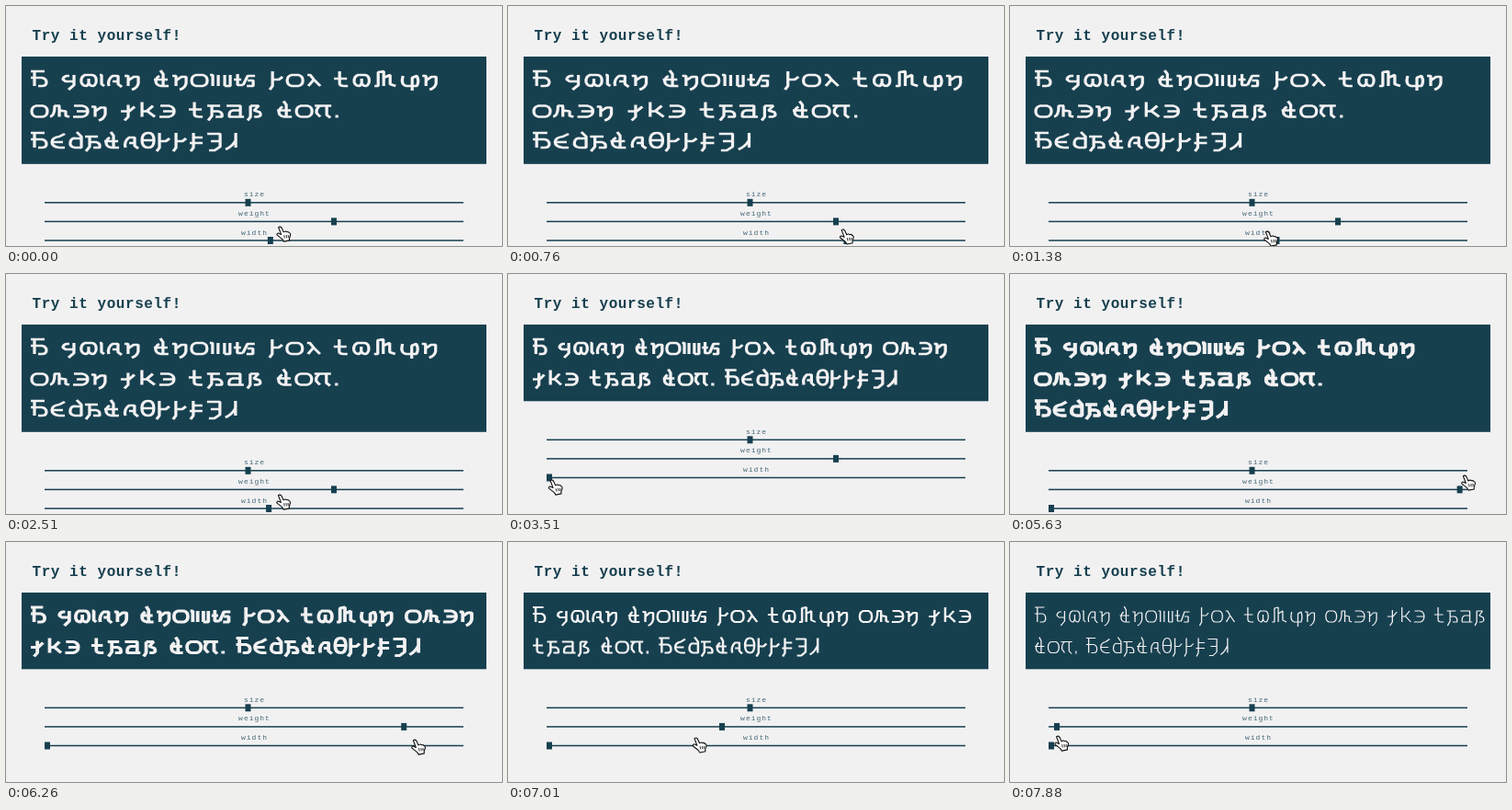
Write an HTML page with a canvas that moves like this. It is 540 px wide and 261 px high and loops after 8000 ms.

```html
<!DOCTYPE html>
<html lang="en">
<head>
<meta charset="utf-8">
<title>Type tester</title>
<style>
html, body { margin: 0; width: 100%; height: 100%; overflow: hidden; background: #f2f1f2; }
canvas { display: block; }
</style>
</head>
<body>
<canvas id="stage" width="540" height="261"></canvas>
<script>
const ctx = document.getElementById('stage').getContext('2d');
const INK = '#17404f', PAPER = '#f2f1f2', LOOP = 8000;
const NIB = 1.25; // the pen is a little wider than it is tall

// letter: [advance, centre line]
const glyphs = {
  B: [21, 'M0 3H15M4 3V19M0 10H12Q17 11 17 15T12 19H8'],
  s: [20, 'M9 8H6Q2 9 2 12L5 14H14M14 7V18L8 23'],
  w: [22, 'M6 7Q1 9 2 15Q3 19 8 19L10 16V11M10 16Q11 19 15 19Q19 17 18 11Q17 7 13 7H5'],
  i: [7, 'M0 7H2V17L5 19'],
  d: [20, 'M3 19Q1 12 7 8H13V17L17 20M7 14H13'],
  h: [20, 'M0 8H4V19M4 13L10 9H15V16Q14 21 8 23'],
  e: [20, 'M7 2L10 6V19M0 12H15M6 8Q2 10 2 14T8 19H16'],
  o: [21, 'M6 7H13Q18 8 18 13T13 19H6Q1 18 1 13T6 7Z'],
  m: [26, 'M0 7H3V19M9 7V19M16 7V19M16 19H22V7'],
  z: [27, 'M0 12H8M4 6V18H10M10 18L15 8H23M15 13H21V19H14'],
  F: [18, 'M3 3V19L0 23M3 12H10L14 9'],
  l: [19, 'M2 7H5L9 12L16 19M9 12L3 19'],
  t: [20, 'M6 3V16Q6 19 11 19H15M0 11H14'],
  M: [30, 'M2 19H6V4L12 3V19M12 10L19 7V17L25 19'],
  f: [24, 'M3 8Q0 18 7 19H18Q21 14 18 8L13 10V24'],
  n: [24, 'M0 19Q5 18 5 7H11M10 7V19M10 12L17 13V18L21 19'],
  E: [21, 'M2 7H11Q17 8 17 13T11 19H1M5 13H17'],
  j: [20, 'M8 6V19L4 23M0 13H9L15 8'],
  k: [21, 'M3 3V19M3 13H8L15 7M9 13L17 19'],
  b: [21, 'M0 7H14M5 7V18L1 23M5 13H12Q17 14 16 19H9'],
  a: [22, 'M0 7H15V19M15 12H7Q2 13 3 19H19'],
  r: [21, 'M4 7V19L1 23M4 7H13L8 12L14 14Q17 18 12 19H8'],
  p: [22, 'M0 7H18M6 7Q1 10 2 15L6 19M13 7V17L17 20'],
  '.': [6, 'M2 17V20'],
  C: [20, 'M16 4L10 7Q2 8 2 13T10 19H16M2 13H14'],
  D: [18, 'M9 2L14 7V19H7Q1 18 2 13T8 9H14'],
  T: [17, 'M8 3Q1 3 1 11T8 19Q14 19 14 11T8 3M1 11H14'],
  X: [18, 'M4 3V19L1 23M4 8H14M0 14H14'],
  Z: [20, 'M1 4H15V12H5M15 12V18L9 22H3'],
  A: [18, 'M12 3V19M12 11Q8 18 1 21']
};
for (const key in glyphs) glyphs[key][1] = new Path2D(glyphs[key][1]);
const words = 'B swidh ehomz Fol twMfh onEh jkE tbar eop. BCDbedTFFXZA'.split(' ');

// Eased value between [time, value] keys
function track(keys, t) {
  const last = keys.length - 1;
  if (t >= keys[last][0]) return keys[last][1];
  const n = keys.findIndex(key => key[0] > t);
  if (n < 1) return keys[0][1];
  const [t0, a] = keys[n - 1], [t1, b] = keys[n];
  return a + (b - a) * (1 - Math.cos(Math.PI * (t - t0) / (t1 - t0))) / 2;
}

const widthKeys = [[-400, 248], [640, 371], [2110, 212], [2720, 312.5], [3400, 45]];
const weightKeys = [[5250, 357], [5680, 494], [6080, 400], [6360, 446], [7600, 51]];
const travelKeys = [[3420, 45], [3500, 48], [3750, 48], [4600, 360]];
const heightKeys = [[0, 240], [1380, 245], [2510, 240], [3400, 224], [5010, 223], [6260, 215], [7700, 211]];
const LEAD = 60; // the thumb trails the pointer

function pointerX(t) {
  if (t < 3420) return track(widthKeys, t + LEAD);
  return t < 5150 ? track(travelKeys, t) : track(weightKeys, t + LEAD) + 1.5;
}

const fraction = x => (x - 45) / 449;

function layout(k) {
  const placed = [];
  let x = 27, line = 0;
  for (const word of words) {
    const size = [...word].reduce((sum, c) => sum + glyphs[c][0], 0) * k;
    if (x > 27 && x + size > 522) { x = 27; line++; }
    for (const c of word) {
      placed.push([c, x, 68 + line * 33.5]);
      x += glyphs[c][0] * k;
    }
    x += 12 * k;
  }
  return { placed, lines: line + 1 };
}

function label(text, x, y, font, spacing, align) {
  ctx.font = font + ' "Liberation Mono", monospace';
  ctx.letterSpacing = spacing + 'px';
  ctx.textAlign = align;
  ctx.fillText(text, x, y);
}

function drawText(placed, k, weight) {
  const path = new Path2D();
  for (const [c, x, y] of placed)
    path.addPath(glyphs[c][1], new DOMMatrix([k / NIB, 0, 0, 1, x / NIB, y]));
  ctx.save();
  ctx.scale(NIB, 1);
  ctx.strokeStyle = PAPER;
  ctx.lineWidth = 1 + 2.3 * weight;
  ctx.lineJoin = 'bevel';
  ctx.stroke(path);
  ctx.restore();
}

function slider(name, x, y) {
  ctx.fillStyle = INK;
  ctx.fillRect(42, y - 0.75, 456, 1.5);
  ctx.fillRect(x - 3, y - 4, 6, 8);
  ctx.fillStyle = '#456977';
  label(name, 270.5, y - 6.5, '8px', 1, 'center');
}

const hand = new Path2D('M-2 1Q0-1 2 1.5L4.5 6Q7 4 8 5.5Q10 4.5 11 6Q12.5 6 13 8L12 13L12.5 15L6 17L4 14.5L-3 10Q-3 7.5-1 8L2 9Z');
const creases = new Path2D('M5.5 9.5L6.5 13M8 9L8.8 12.5M10.3 8.7L10.8 12');

function pointer(x, y) {
  ctx.save();
  ctx.translate(x, y);
  ctx.rotate(0.1);
  ctx.scale(0.92, 0.92);
  ctx.lineJoin = 'round';
  ctx.fillStyle = '#fff';
  ctx.strokeStyle = '#111';
  ctx.lineWidth = 1.2;
  ctx.fill(hand);
  ctx.stroke(hand);
  ctx.lineWidth = 0.9;
  ctx.stroke(creases);
  ctx.restore();
}

function draw(t) {
  const widthX = track(widthKeys, t), weightX = track(weightKeys, t);
  const weight = fraction(weightX);
  const k = 0.6875 + 0.21 * weight + 0.127 * Math.max(0, weight - 0.695) + 0.309 * fraction(widthX);
  const { placed, lines } = layout(k);
  const bottom = 71.3 + 33.5 * lines;

  ctx.fillStyle = PAPER;
  ctx.fillRect(0, 0, 540, 261);
  ctx.fillStyle = INK;
  label('Try it yourself!', 28.5, 36.5, 'bold 16px', 0.55, 'left');
  ctx.fillRect(17, 55, 506, bottom - 55);
  drawText(placed, k, weight);
  [['size', 263.5], ['weight', weightX], ['width', widthX]]
    .forEach(([name, x], n) => slider(name, x, bottom + 42 + 20.6 * n));
  pointer(pointerX(t), track(heightKeys, t));
}

function frame() {
  draw(performance.now() % LOOP);
  requestAnimationFrame(frame);
}
frame();
</script>
</body>
</html>
```
